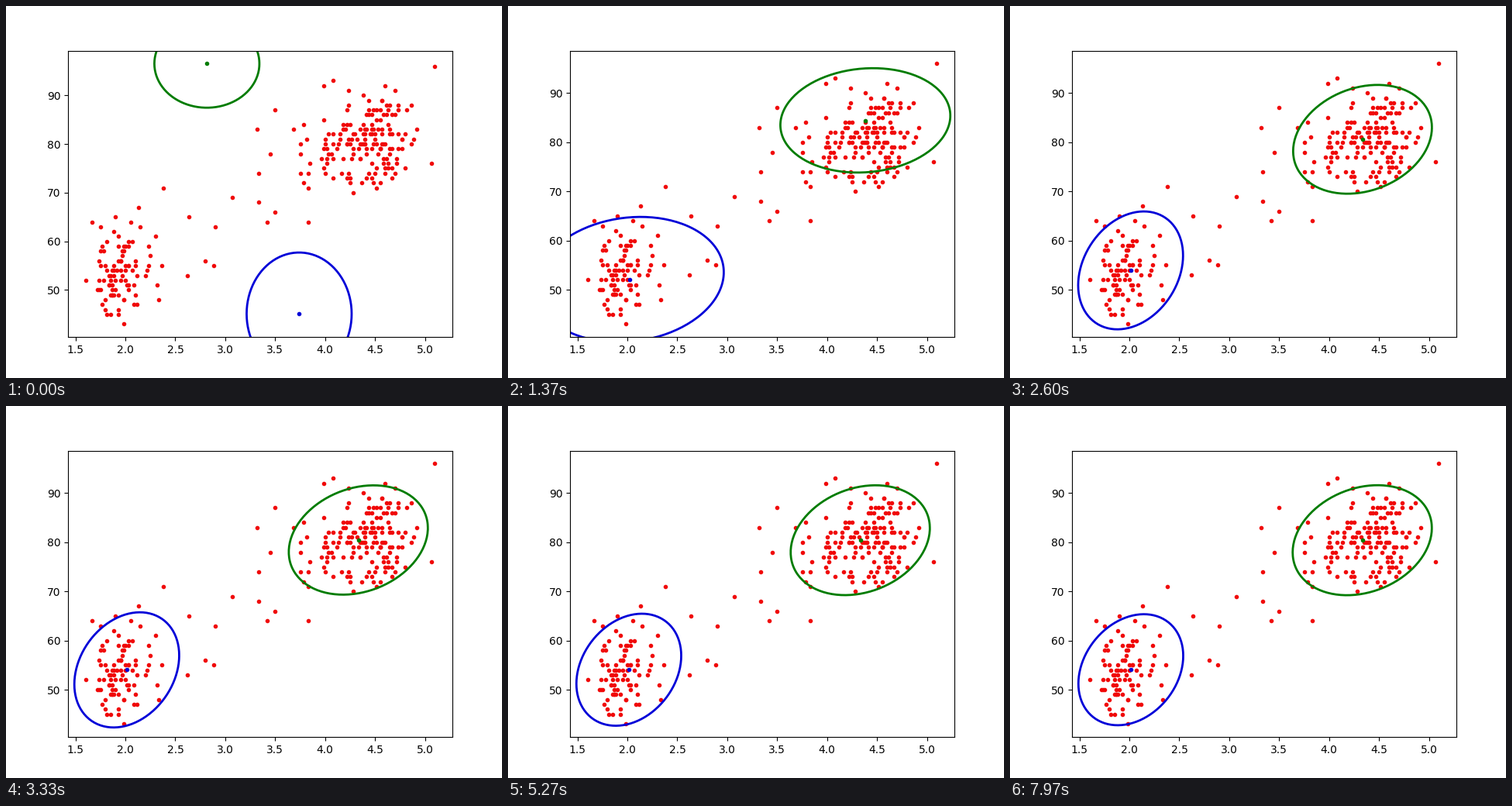
A matplotlib script for the animation above (8000 ms loop, 640 px wide and 480 px high).

```python
import numpy as np
import matplotlib.pyplot as plt
from matplotlib.animation import FuncAnimation

STEP, FRAMES = 32, 250
RED, GREEN, BLUE = "#f00808", "#007c00", "#0000d8"

# Lone points outside the two clouds
LONE = [(1.6, 52), (1.667, 64), (1.983, 43), (2.133, 67), (2.383, 71),
        (2.633, 65), (2.617, 53), (2.9, 63), (2.8, 56), (2.883, 55),
        (3.067, 69), (3.317, 83), (3.333, 74), (3.333, 68), (3.417, 64),
        (3.45, 78), (3.5, 87), (3.5, 66), (3.833, 64), (4.083, 93),
        (5.067, 76), (5.1, 96)]

# A fit is centre x, centre y, half width, half height, correlation.
# It passes start, widest and nearly settled, then decays to its limit.
WIDEST, SETTLED = 870, 1900
DECAY = np.array([500, 500, 500, 1500, 500])  # heights settle slowest
GREEN_FIT = np.array([
    (2.816, 96.5, 0.526, 9.05, 0), (4.41, 88.75, 0.982, 10.1, 0),
    (4.343, 81.15, 0.689, 11.0, 0.21), (4.332, 80.42, 0.697, 11.2, 0.22)])
BLUE_FIT = np.array([
    (3.74, 45.1, 0.526, 12.6, 0), (2.062, 50.1, 1.273, 12.85, 0),
    (2.006, 53.52, 0.526, 12.42, 0.26), (2.014, 54.06, 0.525, 11.28, 0.25)])


def cloud(rng, count, x0, width, skew, y_mid, tilt, spread, y_range):
    """Skewed cloud on the measuring grid: 1/60 across, whole numbers up."""
    x = x0 + width * rng.beta(*skew, 3 * count)
    y = y_mid + tilt * (x - x.mean()) + rng.normal(0, spread, x.size)
    keep = (y > y_range[0]) & (y < y_range[1])
    return np.column_stack((np.round(x * 60) / 60, np.rint(y)))[keep][:count]


def make_points():
    rng = np.random.default_rng(12)
    short = cloud(rng, 88, 1.72, 0.78, (1.2, 2.3), 53.8, 6, 5, (44.5, 65.5))
    long = cloud(rng, 160, 3.52, 1.48, (3.1, 2.2), 80.2, 5, 5, (69.5, 92.5))
    return np.vstack((LONE, short, long))


def hermite(u, h, a, b, slope_a, slope_b):
    v = 1 - u
    return (v * v * ((1 + 2 * u) * a + u * h * slope_a)
            + u * u * ((1 + 2 * v) * b - v * h * slope_b))


def fit_at(t, fit):
    start, wide, near, limit = fit
    if t >= SETTLED:
        return limit + (near - limit) * np.exp((SETTLED - t) / DECAY)
    rest = SETTLED - WIDEST
    before, after = (wide - start) / WIDEST, (near - wide) / rest
    # Harmonic mean keeps the motion monotone; turning points get no slope
    turn = before * after <= 0
    mid = np.where(turn, 0,
                   2 * before * after / np.where(turn, 1, before + after))
    if t < WIDEST:
        return hermite(t / WIDEST, WIDEST, start, wide, 1.5 * before, mid)
    return hermite((t - WIDEST) / rest, rest, wide, near, mid,
                   (limit - near) / DECAY)


def ellipse(cx, cy, w, h, rho):
    a = np.linspace(0, 2 * np.pi, 181)
    c, s = np.cos(a), np.sin(a)
    return cx + w * c, cy + h * (rho * c + np.sqrt(1 - rho ** 2) * s)


points = make_points()
fig, ax = plt.subplots(figsize=(6.4, 4.8), dpi=100)
ax.plot(*points.T, ".", color=RED)
ax.set_xlim(1.425, 5.275)

models = []
for fit, color in ((GREEN_FIT, GREEN), (BLUE_FIT, BLUE)):
    dot, = ax.plot([], [], ".", color=color)
    ring, = ax.plot([], [], color=color, lw=2, solid_capstyle="butt")
    models.append((fit, dot, ring))


def update(frame):
    heights = [43, 96]
    artists = []
    for fit, dot, ring in models:
        now = fit_at(frame * STEP, fit)
        dot.set_data([now[0]], [now[1]])
        ring.set_data(*ellipse(*now))
        heights.append(now[1])
        artists += [dot, ring]
    # The axis stretches while a centre lies above the data
    low, high = min(heights), max(heights)
    pad = 0.05 * (high - low)
    ax.set_ylim(low - pad, high + pad)
    return artists


anim = FuncAnimation(fig, update, frames=FRAMES, interval=STEP,
                     init_func=lambda: update(0), repeat=True, repeat_delay=0)
plt.show()
```
